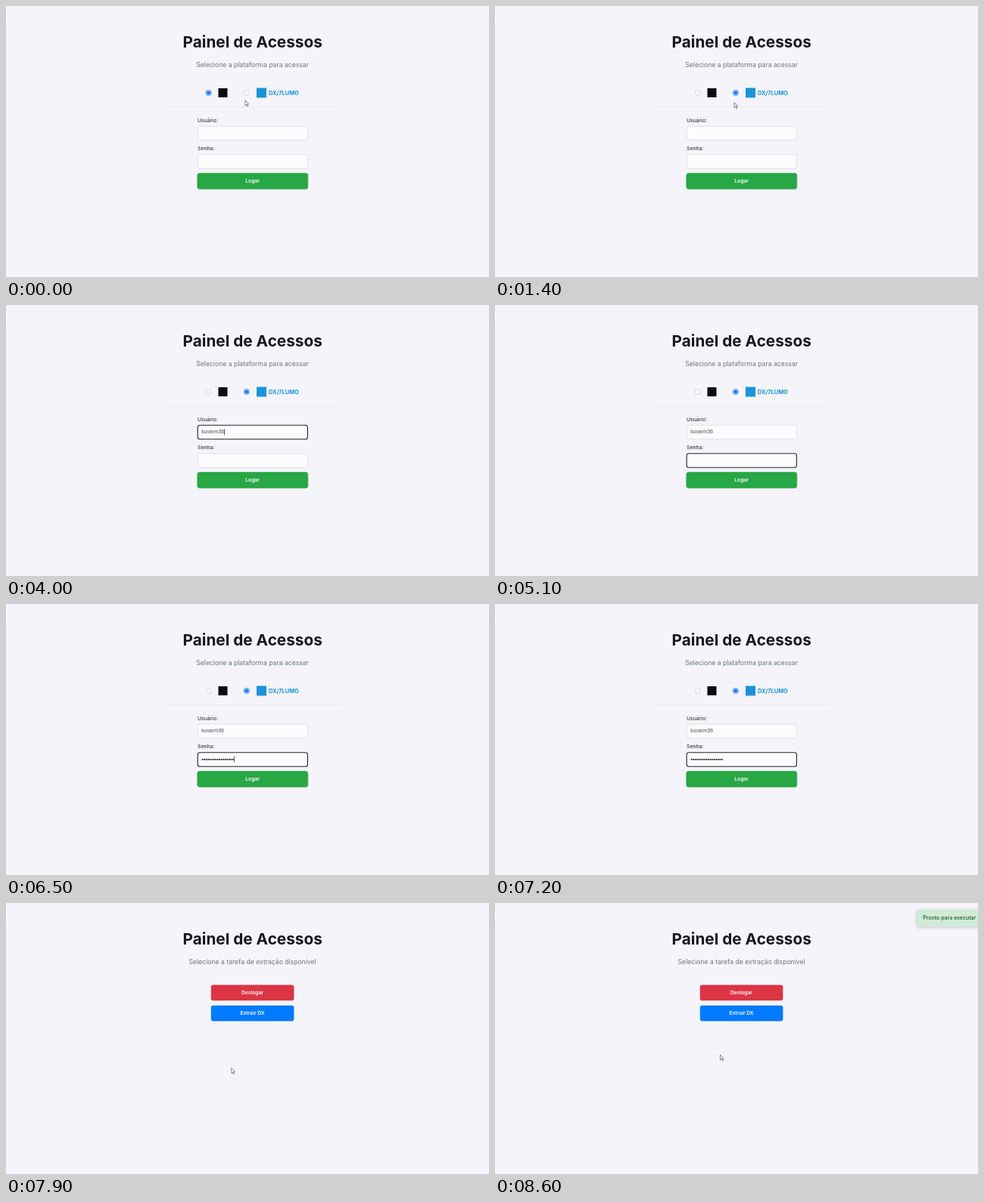
These frames come from a looping animation (638 by 359 pixels, 8700 ms). An HTML page:

```html
<!DOCTYPE html>
<html lang="pt">
<head>
<meta charset="utf-8">
<title>Painel de Acessos</title>
<style>
  html, body { margin: 0; height: 100%; overflow: hidden; background: #f4f4fa; }
  svg { display: block; width: 638px; height: 359px; }
  text { font: 500 6.8px Inter, sans-serif; fill: #343a40; }
  .mid { text-anchor: middle; }
  #title { font-size: 20.75px; font-weight: 700; fill: #15181f; }
  #sub { font-size: 8.65px; font-weight: 400; fill: #6c757d; }
  .brand { font-size: 7.4px; font-weight: 700; fill: #1c93d8; }
  .btn { font-size: 6.7px; font-weight: 600; fill: #fff; }
  .value { font: 400 6.8px "Liberation Sans", Arial, sans-serif; fill: #495057; }
  #pass { font-size: 7.2px; fill: #15181f; }
  .field { fill: #fcfbfe; stroke: #dedfe7; stroke-width: .9; }
  .field.focus { stroke: #22242b; stroke-width: 1.1; }
  .ring { fill: #fff; stroke: #c8c9cf; stroke-width: .8; }
  .dot { fill: none; }
  .on .ring { stroke: #0d75f5; stroke-width: 1; }
  .on .dot { fill: #0d75f5; }
  #caret { fill: #15181f; }
  .pointer { fill: #fff; stroke: #33363c; stroke-width: .6; stroke-linejoin: round; }
  #toast rect { fill: #d0ead6; filter: drop-shadow(0 1px 2px #0003); }
  #toast text { font-size: 7px; fill: #155724; }
</style>
</head>
<body>
<svg viewBox="0 0 638 359">
  <rect y="10" width="1" height="14" fill="#fff"/>
  <text id="title" class="mid" x="325.7" y="55.3">Painel de Acessos</text>
  <text id="sub" class="mid" x="325.6" y="80.5"></text>

  <g id="login">
    <g id="radio1"><circle class="ring" cx="267.6" cy="115" r="3.4"/><circle class="dot" cx="267.6" cy="115" r="2.3"/></g>
    <rect x="280.5" y="109" width="12" height="12" fill="#0b0c0f"/>
    <g id="radio2"><circle class="ring" cx="317.8" cy="115" r="3.4"/><circle class="dot" cx="317.8" cy="115" r="2.3"/></g>
    <rect x="331" y="108.5" width="13" height="13" fill="#1c93d8"/>
    <text class="brand" x="347" y="117.6">DX/7LUMO</text>
    <path d="M209 133.6H441" stroke="#ebebf1"/>
    <text x="253" y="154">Usuário:</text>
    <rect id="field1" class="field" x="253.2" y="159.2" width="145.2" height="18.6" rx="2.8"/>
    <text id="user" class="value" x="258.3" y="170.4"></text>
    <text x="253" y="191.4">Senha:</text>
    <rect id="field2" class="field" x="253.2" y="196.7" width="145.2" height="18.6" rx="2.8"/>
    <text id="pass" class="value" x="258.3" y="208.2"></text>
    <rect id="caret" width=".7" height="8"/>
    <g id="submit">
      <rect x="252.8" y="221.6" width="146" height="20.8" rx="2.8" stroke="#2fae4c" stroke-width=".7"/>
      <text class="btn mid" x="325.6" y="234.2">Logar</text>
    </g>
  </g>

  <g id="tasks">
    <rect x="270.8" y="108.5" width="109.6" height="20.7" rx="2.8" fill="#dc3545"/>
    <text class="btn mid" x="325.5" y="121.2">Deslogar</text>
    <rect x="270.8" y="135.7" width="109.6" height="20.7" rx="2.8" fill="#007bff"/>
    <text class="btn mid" x="325.5" y="148.4">Extrair DX</text>
  </g>

  <g id="toast">
    <rect y="8.8" width="98" height="22.4" rx="2.8"/>
    <text x="8.3" y="22.3">Pronto para executar</text>
  </g>

  <path id="arrow" class="pointer" d="M0 0V6.8L1.6 5.5 2.7 8 3.8 7.5 2.7 5.1H4.7Z"/>
  <path id="hand" class="pointer" d="M-.9 .9Q0-.6 .9 .9V3.6L3 4.2Q4 4.6 3.9 5.6L3.2 9H-1L-3.2 5.8Q-3.2 4.5-2 5L-.9 5.8Z"/>
</svg>
<script>
const LOOP = 8700, STEP = 100, NAME = "kuvarm36";
const $ = id => document.getElementById(id);
const show = (id, on) => { $(id).style.display = on ? "" : "none"; };
const move = (id, x, y) => $(id).setAttribute("transform", `translate(${x} ${y})`);
const clamp = v => Math.max(0, Math.min(1, v));
const within = (t, a, b) => t >= a && t < b;

// When each letter of the user name is typed
const keys = [2700, 2900, 3100, 3100, 3300, 3400, 3600, 3700];

// Pointer path: time, x, y
const path = [
  [0, 316, 125], [200, 333, 116], [500, 320.5, 113], [1200, 320.5, 113],
  [1400, 316, 127.8], [1600, 293, 157.6], [7100, 294, 180],
  [7400, 297.8, 228], [7700, 297.8, 228], [7800, 297.8, 221], [8600, 297.5, 201]
];

function pointerAt(t) {
  const i = path.findIndex(p => p[0] > t);
  if (i < 0) return path.at(-1).slice(1);
  const [t0, x0, y0] = path[i - 1], [t1, x1, y1] = path[i];
  const k = (t - t0) / (t1 - t0);
  return [x0 + (x1 - x0) * k, y0 + (y1 - y0) * k];
}

function drawCaret(t) {
  const first = t < 4500;
  const on = within(t, 1800, 2300) || within(t, 2700, 4200) ||
             within(t, 4500, 5100) || within(t, 5500, 7000);
  const field = $(first ? "user" : "pass");
  const width = on && field.textContent ? field.getComputedTextLength() : 0;
  $("caret").setAttribute("x", 258.5 + width);
  $("caret").setAttribute("y", first ? 164.3 : 201.8);
  show("caret", on);
}

function draw(t) {
  const done = t >= 7800;
  show("login", !done);
  show("tasks", done);
  $("sub").textContent = done
    ? "Selecione a tarefa de extração disponível"
    : "Selecione a plataforma para acessar";

  $("radio1").classList.toggle("on", t < 1000);
  $("radio2").classList.toggle("on", t >= 1000);
  $("field1").classList.toggle("focus", within(t, 1800, 4500));
  $("field2").classList.toggle("focus", within(t, 4500, 7600));
  $("user").textContent = NAME.slice(0, keys.filter(k => k <= t).length);
  const dots = t < 5500 ? 0 : Math.min(17, Math.floor(1 + (t - 5500) / 61.5));
  $("pass").textContent = "•".repeat(dots);
  drawCaret(t);

  const hover = clamp((t - 7300) / 200);
  const mix = (a, b) => a + (b - a) * hover;
  $("submit").setAttribute("fill", `rgb(${mix(40, 33)},${mix(167, 136)},${mix(69, 56)})`);
  move("submit", 0, -hover);

  const slide = clamp((t - 8300) / 300);
  show("toast", slide > 0);
  move("toast", 638 - 81 * slide * (2 - slide), 0);

  const hand = within(t, 7400, 7800);
  const [x, y] = pointerAt(t);
  show("hand", hand);
  show("arrow", !hand && !within(t, 1800, 7300));
  move("hand", x, y);
  move("arrow", x, y);
}

const start = performance.now();
function tick() {
  const t = (performance.now() - start) % LOOP;
  draw(Math.floor(t / STEP) * STEP);
  requestAnimationFrame(tick);
}
tick();
</script>
</body>
</html>
```
